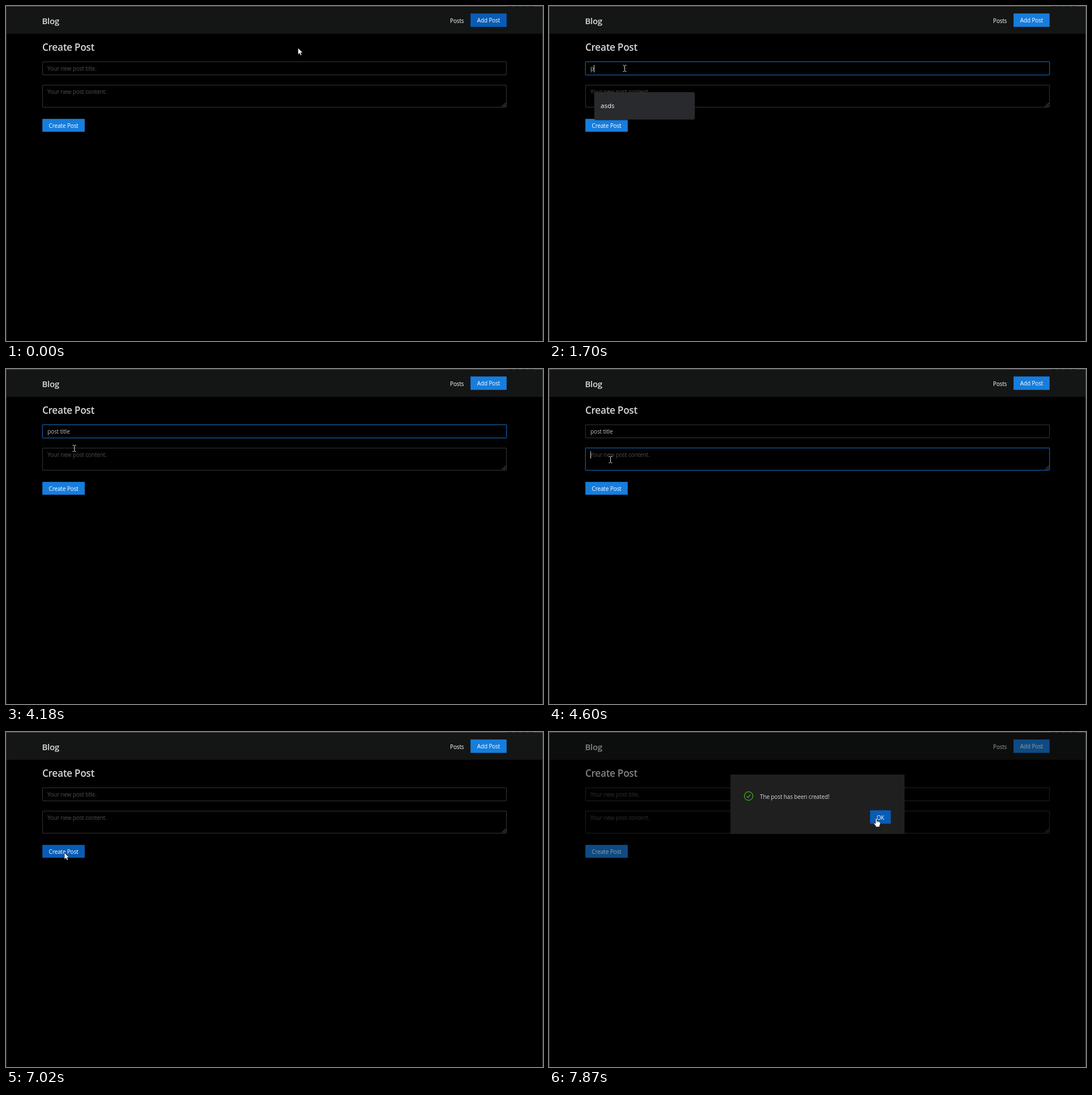
Recreate the animation shown at these times as an HTML page. Size 947 by 591 pixels, loop 8000 ms.

```html
<!DOCTYPE html>
<html lang="en">
<head>
<meta charset="utf-8">
<title>Create Post</title>
<style>
html, body { margin: 0; width: 100%; height: 100%; overflow: hidden; background: #000; }
body { font: 10px/14px "Open Sans", "Noto Sans", sans-serif; letter-spacing: -.13px; color: #d9d9d9; }
#stage { position: relative; width: 947px; height: 591px; overflow: hidden; }
#stage div, #stage svg { position: absolute; box-sizing: border-box; white-space: pre; }
.bar { left: 0; top: 0; width: 947px; height: 49px; background: #141515; }
.title { font-weight: 600; font-size: 17.2px; line-height: 24px; letter-spacing: -.3px; left: 64px; }
.field { left: 64px; width: 819px; border: 1px solid; border-radius: 1px; padding: 4px 8px; color: #bdbdbd; }
.field i { font-style: normal; color: #4f4f4f; }
.field b { display: inline-block; width: 1px; height: 13px; margin-right: -1px; background: #ddd; vertical-align: -3px; }
.btn { color: #fff; text-align: center; border-radius: 1px; height: 24px; line-height: 25px; box-shadow: inset 0 0 0 1px rgba(0,0,0,.15); }
#pop { left: 80px; top: 152px; width: 177px; height: 48px; border-radius: 3px; background: #292a2d;
  box-shadow: 0 1px 2px #111; color: #fff; font-size: 11.5px; font-weight: 500; line-height: 48px; padding-left: 11px; letter-spacing: 0; }
#mask { inset: 0; background: #000; }
#modal { left: 320px; top: 75px; width: 307px; height: 105px; background: #1f1f1f; transform-origin: -217px 142px; }
</style>
</head>
<body>
<div id="stage">
  <div class="bar"></div>
  <div class="title" style="left:63.5px;top:14px;font-size:15px">Blog</div>
  <div style="left:783px;top:19px;color:#fff">Posts</div>
  <div class="btn" id="add" style="left:819px;top:13px;width:64px">Add Post</div>
  <div class="title" style="top:61px">Create Post</div>
  <div class="field" id="name" style="top:98px;height:24px"></div>
  <div class="field" id="text" style="top:139px;height:40px"></div>
  <svg style="left:874px;top:170px" width="8" height="8" stroke="#777" fill="none"><path d="M1 7.5L7.5 1M4.5 7.5L7.5 4.5"/></svg>
  <div class="btn" id="create" style="left:64px;top:199px;width:75px;height:23px">Create Post</div>
  <div id="pop">asds</div>
  <div id="mask"></div>
  <div id="modal">
    <svg style="left:23px;top:29px" width="18" height="18" fill="none" stroke="#49aa19" stroke-width="1.3">
      <circle cx="9" cy="9" r="7.6"/><path d="M5.8 9.2L8.2 11.7L12.2 6.4"/>
    </svg>
    <div style="left:52px;top:32px">The post has been created!</div>
    <div class="btn" style="left:246px;top:63px;width:37px;line-height:26px;background:#095cb5">OK</div>
  </div>
  <div style="left:0;top:0;width:947px;height:1px;background:#4a4a4a"></div>
  <div style="left:0;top:0;width:1px;height:591px;background:#3a3a3a"></div>
  <div style="left:946px;top:0;width:1px;height:591px;background:#484848"></div>
  <div style="left:886px;top:0;width:48px;height:1px;background:repeating-linear-gradient(90deg,#2a2a2a 0 7px,#4a4a4a 7px 12px)"></div>
  <svg id="arrow" width="12" height="18" style="overflow:visible">
    <path d="M0 0V11.6L2.7 9.2L4.5 13.2L6.5 12.3L4.7 8.4H8.2Z" fill="#fff" stroke="#000" stroke-width=".6"/>
  </svg>
  <svg id="beam" width="12" height="18" style="overflow:visible" fill="none" stroke="#ddd">
    <path d="M-2.5 -5.5H-.5L.5 -4.5L1.5 -5.5H3.5M.5 -5V5M-2.5 5.5H-.5L.5 4.5L1.5 5.5H3.5"/>
  </svg>
  <svg id="hand" width="16" height="20" style="overflow:visible">
    <path d="M-1.2 .8Q0 -.8 1.2 .8V5L3 5.3L5 5.8L6.4 6.6Q7.2 7 7.2 8.4V10.5L6 13.5V15.6H-.8V14L-4.2 9.8Q-4.4 8 -2.9 8.3L-1.2 9.8Z" fill="#fff" stroke="#000" stroke-width=".7"/>
    <path d="M1.2 5V8M3.2 5.4V8M5.2 6V8.3" stroke="#444" stroke-width=".5"/>
  </svg>
</div>
<script>
const LOOP = 8000;
const $ = id => document.getElementById(id);

// Each step holds until the next; at = cursor [kind, x, y], the rest are text or amounts 0..1.
const steps = [
  [0, { at: ['arrow', 515, 73.5], add: 1, create: 0, name: '', text: '', nameFocus: 0, textFocus: 0, caret: '', pop: 0, modal: 0 }],
  [250, { at: ['arrow', 307, 84] }],
  [390, { at: ['beam', 178, 107], nameFocus: .45 }],
  [510, { at: ['beam', 133, 110], nameFocus: .7 }],
  [660, { nameFocus: .85, caret: 'name' }],
  [780, { pop: 1, nameFocus: .95 }],
  [930, { add: .4, nameFocus: 1 }],
  [1050, { add: 0 }],
  [1300, { caret: '' }],
  [1700, { name: 'p', caret: 'name' }],
  [1820, { name: 'po', pop: 0 }],
  [1940, { name: 'pos' }],
  [2220, { name: 'post' }],
  [2340, { name: 'post ' }],
  [2590, { name: 'post t' }],
  [2840, { name: 'post ti' }],
  [2960, { name: 'post tit' }],
  [3240, { name: 'post title' }],
  [3760, { caret: '' }],
  [3880, { at: ['beam', 137, 106] }],
  [4030, { at: ['arrow', 157, 87] }],
  [4180, { at: ['beam', 120, 140] }],
  [4330, { at: ['beam', 108, 160], textFocus: .4 }],
  [4450, { nameFocus: .5, textFocus: .7, caret: 'text' }],
  [4600, { nameFocus: 0, textFocus: 1 }],
  [4750, { at: ['beam', 110, 170] }],
  [4870, { text: 'd' }],
  [4990, { text: 'd f' }],
  [5110, { text: 'd fsd' }],
  [5260, { text: 'd fsdf', at: ['beam', 118, 168] }],
  [5380, { text: 'd fsdf s', at: ['beam', 127, 165] }],
  [5500, { text: 'd fsdf sd', at: ['beam', 131, 163] }],
  [5640, { text: 'd fsdf sdd' }],
  [5760, { text: 'd fsdf sddsf' }],
  [5880, { text: 'd fsdf sddsf ' }],
  [6000, { text: 'd fsdf sddsf s' }],
  [6120, { text: 'd fsdf sddsf sdf' }],
  [6240, { at: ['beam', 152, 172] }],
  [6360, { at: ['arrow', 146, 191] }],
  [6510, { at: ['hand', 112, 220], create: .5 }],
  [6630, { at: ['hand', 104, 218], create: 1 }],
  [6780, { textFocus: .5, caret: '' }],
  [6900, { textFocus: 0 }],
  [7020, { at: ['arrow', 103, 213], name: '', text: '' }],
  [7170, { at: ['arrow', 122, 222], modal: .25, create: .7 }],
  [7320, { at: ['arrow', 205, 238], modal: .85, create: .2 }],
  [7450, { at: ['arrow', 292, 238], modal: 1, create: 0 }],
  [7600, { at: ['arrow', 440, 205] }],
  [7720, { at: ['arrow', 556, 170] }],
  [7870, { at: ['hand', 576.5, 151.5] }]
];

const mix = (a, b, k) => `rgb(${a.map((v, i) => Math.round(v + (b[i] - v) * k))})`;
const btnColor = k => mix([23, 125, 220], [9, 92, 181], k);

function field(id, s, hint) {
  const k = s[id + 'Focus'], caret = s.caret === id ? '<b></b>' : '';
  $(id).style.borderColor = mix([52, 52, 52], [22, 89, 158], k);
  $(id).style.boxShadow = `0 0 0 1px rgba(23,125,220,${.22 * k})`;
  $(id).innerHTML = s[id] ? s[id] + caret : `${caret}<i>${hint}</i>`;
}

function render(s) {
  field('name', s, 'Your new post title.');
  field('text', s, 'Your new post content.');
  $('add').style.backgroundColor = btnColor(s.add);
  $('create').style.backgroundColor = btnColor(s.create);
  $('pop').style.opacity = s.pop;
  $('mask').style.opacity = .4 * s.modal;
  $('modal').style.opacity = s.modal;
  $('modal').style.transform = s.modal < 1 ? `scale(${.2 + .8 * s.modal})` : 'none';
  const [kind, x, y] = s.at;
  for (const id of ['arrow', 'beam', 'hand']) {
    $(id).style.display = id === kind ? 'block' : 'none';
    $(id).style.left = x + 'px';
    $(id).style.top = y + 'px';
  }
}

let last = -1;
function tick() {
  const t = performance.now() % LOOP;
  const n = steps.filter(([at]) => at <= t).length;
  if (n !== last) {
    render(Object.assign({}, ...steps.slice(0, n).map(([, change]) => change)));
    last = n;
  }
  requestAnimationFrame(tick);
}
tick();
</script>
</body>
</html>
```
